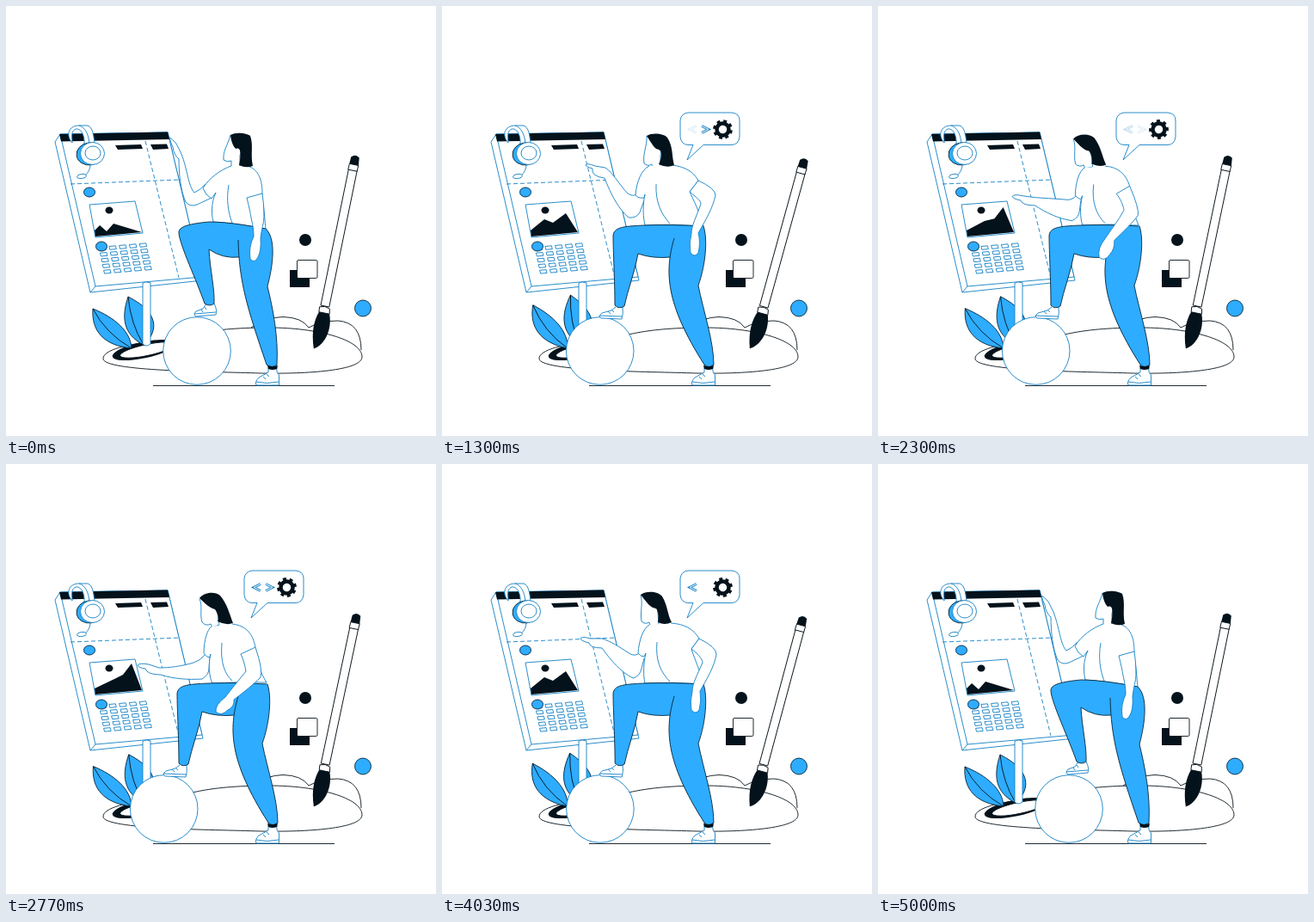
Animation, 500 px wide and 500 px high, one loop 5030 ms. Source, as an HTML page:

```html
<!DOCTYPE html>
<html lang="en">
<head>
<meta charset="utf-8">
<title>Designer at the board</title>
<style>
html, body { margin: 0; width: 100%; height: 100%; overflow: hidden; background: #fff; }
svg { display: block; width: 100vw; height: 100vh; }
.l { fill: #fff; stroke: #1480c4; stroke-width: .9; stroke-linejoin: round; }
.d { fill: #fff; stroke: #06121a; stroke-width: .9; stroke-linejoin: round; }
.k { fill: #03121b; }
.b { fill: #2eacff; stroke: #06263c; stroke-width: .9; }
.n { fill: none; }
</style>
</head>
<body>
<svg viewBox="0 0 500 500">
  <!-- ground -->
  <path class="d" d="M285 374Q303 362 322 361.500Q344 362 352 374Q366 366 386 366Q413 368 413 400"/>
  <path class="d" d="M113 410C113 400 140 393 180 389C212 386 225 374 306 374C362 374 414 388 414 408C414 424 350 428 296 427C240 425 113 425 113 410Z"/>
  <ellipse class="k" cx="160" cy="400" rx="37" ry="9.500" transform="rotate(-12 160 400)"/>
  <ellipse class="d" cx="164" cy="400" rx="32" ry="6.500" transform="rotate(-12 164 400)"/>
  <g id="leaf1">
    <path class="b" d="M101 352C99 378 114 395 146 398C145 378 126 362 101 352Z"/>
    <path class="d n" d="M101 352Q116 381 146 398"/>
  </g>
  <g id="leaf2">
    <path class="b" d="M142 338C134 362 136 382 160 394C178 378 178 356 142 338Z"/>
    <path class="d n" d="M142 338Q145 370 160 394"/>
  </g>

  <!-- board -->
  <path class="l" d="M63 149L57 158L98 333L229 319L188 147Z"/>
  <path class="l" d="M63 149L104 326L228 315L188 147ZM104 326L98 333"/>
  <path class="k" d="M62 149L188 146.500L190 155L64 157.500ZM127 162L157 161L159 166L130 167ZM168 161L187 160.500L189 166L171 167Z"/>
  <path class="l n" stroke-dasharray="5 3" d="M75 207L202 202M162 157L201 316"/>
  <path class="l" d="M97 231L150 227L159 264L104 269Z"/>
  <ellipse class="k" cx="120" cy="237.500" rx="4.500" ry="4"/>
  <path class="k" id="hills"/>
  <g id="keys"></g>
  <ellipse class="b" cx="97" cy="216.500" rx="6.500" ry="5.500"/>
  <ellipse class="b" cx="111" cy="279.500" rx="6.500" ry="5.500"/>
  <path class="l" d="M159 322Q163 320 168 322L168 393Q163 397 159 393Z"/>

  <!-- headphones -->
  <path class="l" d="M77 159C69 150 73 139 85 139L95 139C101 141 102 151 103 160L91 162C92 148 86 142 81 143C75 146 77 152 77 159Z"/>
  <path class="l n" d="M85 139C92 141 96 149 97 160M98 184Q98 192 92 197"/>
  <ellipse class="l" cx="88" cy="198" rx="5.500" ry="2.500" transform="rotate(-8 88 198)"/>
  <ellipse class="b" cx="97.500" cy="172" rx="15.500" ry="13" transform="rotate(-8 97 172)"/>
  <ellipse class="l" cx="100.500" cy="171.500" rx="14" ry="13"/>
  <ellipse class="l" cx="101" cy="171" rx="9" ry="8"/>

  <path class="d" d="M171 441.500H382"/>
  <circle class="l" id="ball" cy="401" r="39.300"/>

  <!-- person -->
  <path class="l" id="armL"/>
  <path class="l" id="face"/>
  <path class="l" id="shirt"/>
  <path class="l n" id="fold"/>
  <path class="k" id="hair"/>
  <ellipse fill="#fff" id="ear" rx="3.200" ry="4.500"/>
  <path class="l" id="shoe"/>
  <path class="l" d="M305 420V426L294 432Q289 437 291 441H317.500V429Q314 426 315 420Z"/>
  <path class="l n" d="M291 437Q303 440 317 437M299 431L302 434M303 428L306 431"/>
  <path class="b" id="thigh"/>
  <path class="b" id="leg"/>
  <path class="k" d="M304 417.500Q310 421 316 417.500L315 422Q310 424 305 422Z"/>
  <path class="l" id="armR"/>

  <!-- brush and shapes -->
  <g id="brush">
    <path class="d" d="M-5 -50L-4.500 -212H5.500L5 -50Z"/>
    <path class="k" d="M-5 -217L-4.500 -226Q0 -231 5 -227L6 -217Z"/>
    <path class="d" d="M-5 -211L-4.800 -218H5.800L5.500 -211Z"/>
    <path class="d" d="M-5.500 -42L-6 -48Q0 -51 6 -48L7 -42Z"/>
    <path class="k" d="M-5.500 -42C-9 -32 -10 -18 -3 1C8 -5 14 -24 7 -42Z"/>
  </g>
  <circle class="k" cx="348" cy="272" r="7"/>
  <rect class="k" x="330" y="307" width="23" height="20"/>
  <rect class="d" x="338.500" y="295.500" width="23.500" height="21" rx="1.500"/>
  <circle class="b" cx="415" cy="351.500" r="9.500"/>

  <!-- speech bubble, origin at the tip of its tail -->
  <g id="bubble">
    <path class="l" d="M1 -55H52Q61 -54 61 -46V-27Q60 -18 52 -17.500H19L0 0L7 -17.500H1Q-7 -18 -8 -27V-46Q-7 -54 1 -55Z"/>
    <g id="lt"></g>
    <g id="gt"></g>
    <g id="gear" fill="none" stroke="#03121b">
      <circle r="7" stroke-width="4.500"/>
      <circle r="9.700" stroke-width="3.400" stroke-dasharray="3.809"/>
    </g>
  </g>
</svg>
<script>
const LOOP = 5030;
const $ = id => document.getElementById(id);
const NUM = /-?\d*\.?\d+/g;

// Smooth monotone interpolation of every number in a list of strings.
function track(id, attr, times, values) {
  const rows = values.map(v => v.match(NUM).map(Number));
  const slope = (i, j) => (rows[i + 1][j] - rows[i][j]) / (times[i + 1] - times[i]);
  const tangent = (i, j) => {
    if (i === 0 || i === rows.length - 1) return 0;
    const a = slope(i - 1, j), b = slope(i, j);
    return a * b > 0 ? 2 * a * b / (a + b) : 0;
  };
  return t => {
    let i = 0, j = 0;
    while (i < times.length - 2 && t >= times[i + 1]) i++;
    const span = times[i + 1] - times[i];
    const u = Math.min(1, Math.max(0, (t - times[i]) / span));
    const ease = u * u * (3 - 2 * u);
    const text = values[0].replace(NUM, () => {
      const from = rows[i][j], to = rows[i + 1][j];
      const bend = u * (1 - u) * span * ((1 - u) * tangent(i, j) - u * tangent(i + 1, j));
      j++;
      return (from + (to - from) * ease + bend).toFixed(3);
    });
    $(id).setAttribute(attr, text);
  };
}

// Upper body: six poses; the last one falls back to the fourth.
const BODY = [0, 570, 1300, 1870, 2770, 3050, 4030, 5000];
const body = (id, p, attr = 'd') =>
  track(id, attr, BODY, [p[0], p[1], p[2], p[3], p[4], p[4], p[5] || p[3], p[0]]);

// Legs and ball: step back, stay, return.
const STEP = [0, 570, 1080, 3990, 5000];
const step = (id, p, attr = 'd') => track(id, attr, STEP, [p[0], p[1], p[2], p[2], p[0]]);

const tracks = [
  step('ball', ['222', '201', '183.7'], 'cx'),
  step('thigh', [
    'M302 259C285 256 260 251 236 251C215 253 200 256 201 264C202 278 222 320 231 346Q237 350 242 346C243 330 237 305 236 283Q252 294 271 292',
    'M305 257C285 254 260 254 236 255C210 256 201 257 201 266C202 285 212 325 216 348Q221 352 227 348C229 330 231 310 231 288Q248 295 268 292',
    'M304 256C285 255 260 254 236 255C208 256 200 258 199 267C199 285 201 320 201 348Q206 353 212 349C216 330 224 310 228 288Q245 294 266 292']),
  step('leg', [
    'M270 272C271 320 280 350 303 417Q309 422 315 417C317 385 310 350 304 326C311 300 314 270 302 259',
    'M270 274C266 305 270 345 304 416Q309 422 316 417C317 385 308 350 301 328C309 300 310 272 305 257',
    'M270 270C259 308 259 345 305 417Q310 422 316 417C316 390 304 355 298 325C307 300 309 270 304 256']),
  step('shoe', [
    'M233 346L229 352L221 355Q217 359 221 361L244 359Q246 354 242 346M219 358L244 356M227 353L229 356M231 350L233 353',
    'M217 349L212 353L202 356Q197 360 201 362L225 362Q227 356 225 349M199 359L225 359M208 354L211 357M212 352L214 355',
    'M202 350L197 354L186 357Q181 361 185 363L209 364Q211 358 210 350M183 360L209 361M193 355L196 358M197 353L200 356']),

  body('armL', [
    'M232 207Q226 214 219 217C212 210 211 190 204 172L198 160Q193 154 190 153Q191 158 194 164Q195 173 201 178C201 195 203 215 209 228Q214 234 222 231L239 223',
    'M228 213Q223 222 214 213C206 202 205 190 197 178L189 171Q180 167 178 169Q179 172 187 175Q183 183 195 187C198 205 204 225 214 238Q222 242 228 235L238 226',
    'M226 219Q222 222 216 218C206 208 200 195 190 188L178 186Q168 182 167 185Q168 187 175 189Q173 198 189 200C196 218 205 236 217 246Q226 247 230 240L235 226',
    'M228 221Q222 224 216 219C205 212 196 206 186 203L172 203Q163 200 161 203Q162 206 171 208Q172 214 186 214C196 228 208 242 222 249Q230 247 232 238L235 226',
    'M232 221Q226 229 218 231C205 235 190 237 178 237L166 233Q155 231 153 234Q154 237 162 238Q164 245 180 245C195 250 212 251 228 250Q236 245 236 238L237 225']),
  body('face', [
    'M261 150C258 162 252 168 253 179Q257 182 262 180L262 187L272 187L272 160',
    'M248 151C248 162 241 170 243 180Q246 183 251 182L251 187L262 187L262 160',
    'M238 151C239 162 233 172 235 183Q239 187 244 184L245 188L254 187L254 160',
    'M231 152C234 163 230 172 232 183Q236 187 241 184L242 188L252 187L250 160',
    'M225 157C229 165 225 174 228 184Q233 189 238 186L240 190L248 187L244 160']),
  body('hair', [
    'M261 150C268 146 280 148 284 151C288 162 284 172 287 186Q279 189 271 185C272 180 273 175 272 168C266 168 262 160 261 150Z',
    'M248 151C254 147 268 148 272 152C277 163 274 172 277 185Q270 189 261 185C262 180 264 174 262 168C258 168 254 160 248 151Z',
    'M238 151C244 147 258 148 262 153C269 164 267 174 270 185Q262 189 252 184C254 180 256 174 254 168C248 168 244 160 238 151Z',
    'M231 152C238 147 251 148 256 154C263 166 262 175 267 184Q259 188 251 184C252 179 252 172 249 168C243 168 238 161 231 152Z',
    'M225 156C229 150 242 147 249 153C258 164 260 175 264 185Q256 188 246 183C248 178 246 174 243 169C238 168 232 163 225 156Z']),
  body('ear', ['translate(269 170)', 'translate(259 170)', 'translate(250.500 171)',
    'translate(246 172)', 'translate(240.500 173)'], 'transform'),
  body('shirt', [
    'M262 186C250 190 236 200 229 212Q232 220 239 224L244 217C238 230 239 243 241 251Q270 253 302 259C300 240 300 230 297 222L298 218C298 203 294 189 280 186',
    'M250 186C240 190 232 202 226 215Q229 223 237 227L241 222C236 235 236 247 239 254Q270 253 305 257C302 245 294 230 285 221L299 212C296 198 288 187 277 186',
    'M241 186C232 190 226 205 225 220Q228 224 235 223L236 219C233 232 234 247 236 255Q270 253 304 256C300 240 292 225 288 216L298 203C292 192 282 187 268 185',
    'M241 187C234 191 229 205 228 220Q231 224 235 224L237 220C234 232 234 247 236 255Q270 253 303 256C300 240 290 225 283 216L296 205C290 193 280 187 265 186',
    'M239 189C234 192 230 206 230 220Q233 225 237 225L238 221C235 233 236 247 240 255Q270 253 303 254C297 245 292 230 286 217L290 213C287 198 280 188 263 186',
    'M241 187C234 191 229 205 228 220Q231 224 235 224L237 220C234 232 234 247 236 255Q270 253 304 256C300 240 293 225 290 215L299 203C292 191 281 186 266 185']),
  body('fold', [
    'M259 208C256 225 258 240 264 255', 'M254 208C252 228 256 240 264 253',
    'M249 207C248 228 255 242 265 253', 'M250 207C248 228 254 242 265 253',
    'M251 208C249 230 254 244 263 252']),
  body('armR', [
    'M280 223C283 235 284 240 285 246C287 255 288 260 288 268Q282 280 284 294Q289 300 293 292Q297 285 296 270C297 260 300 252 300 245Q300 230 298 218Z',
    'M285 221C290 226 297 232 296 238C294 250 290 258 290 266Q287 276 289 287Q293 294 297 286Q301 278 299 266C305 255 310 245 311 235Q311 226 299 212Z',
    'M288 216C295 222 301 226 301 230C296 245 290 255 290 265Q287 276 289 287Q294 293 298 287Q301 275 298 264C306 250 315 235 318 220Q318 212 298 203Z',
    'M283 216C290 222 295 229 295 233C290 248 282 258 277 270Q272 283 275 296Q281 301 285 292Q289 283 288 270C296 258 307 246 311 235Q311 227 296 205Z',
    'M273 221C276 227 278 235 279 241C270 252 262 262 255 271Q243 280 244 288Q250 294 258 286Q266 282 265 274C277 265 288 256 296 248Q299 240 290 213Z',
    'M290 215C297 220 303 227 303 231C297 245 291 255 291 265Q288 276 290 286Q295 292 299 286Q302 275 300 264C308 250 317 235 319 221Q319 213 299 203Z']),
  body('hills', [
    'M104 268L103 261L109 255L117 262L125 253L158 263Z',
    'M104 268L103 261L117 253L126 257L141 247L158 263Z',
    'M104 268L103 261L119 248L129 252L144 241L158 263Z',
    'M104 268L103 261L121 250L134 250L145 237L158 263Z',
    'M104 268L103 261L126 250L136 245L146 232L158 263Z',
    'M104 268L103 261L119 248L129 252L144 241L158 263Z']),

  track('bubble', 'transform', [0, 300, 570, 680, 4350, 4750, LOOP],
    [0, 0, .9, 1, 1, 0, 0].map(s => `translate(285 179) scale(${s})`)),
  track('lt', 'opacity', [0, 650, 1300, 1500, 2100, 2650, LOOP], ['1', '1', '.15', '0', '0', '1', '1']),
  track('gt', 'opacity', [0, 350, 570, 950, 1300, 1870, 2150, 2770, 3200, 3800, LOOP],
    ['0', '0', '.3', '1', '1', '.4', '0', '.95', '.95', '0', '0'])
];

// Hollow chevrons: a wide blue stroke with a thin white core.
const chevron = d => ['#1480c4" stroke-width="2.8', '#fff" stroke-width="1']
  .map(s => `<path fill="none" stroke="${s}" d="${d}"/>`).join('');
$('lt').innerHTML = chevron('M11 -39.500L3 -35.500L11 -31.500');
$('gt').innerHTML = chevron('M17 -39.500L25 -35.500L17 -31.500');

let keys = '';
for (let r = 0; r < 5; r++)
  for (let c = 0; c < 5; c++)
    keys += `M${108 + 11.8 * c + 1.4 * r} ${280.5 - 1 * c + 6.7 * r}l7.500 -.7l1 3.800l-7.500 .7z`;
$('keys').innerHTML = `<path class="l" d="${keys}"/>`;

function draw(now) {
  const t = now % LOOP;
  const sway = (1 - Math.cos(t / LOOP * 4 * Math.PI)) / 2;
  tracks.forEach(f => f(t));
  $('brush').setAttribute('transform', `translate(361 398) rotate(${11.4 + 3.9 * sway})`);
  $('leaf1').setAttribute('transform', `rotate(${5.7 * sway} 146 398)`);
  $('leaf2').setAttribute('transform', `rotate(${7.5 * sway} 160 394)`);
  $('gear').setAttribute('transform', `translate(41.500 -35.500) rotate(${t / LOOP * 360})`);
  requestAnimationFrame(() => draw(performance.now() - start));
}
const start = performance.now();
draw(0);
</script>
</body>
</html>
```
